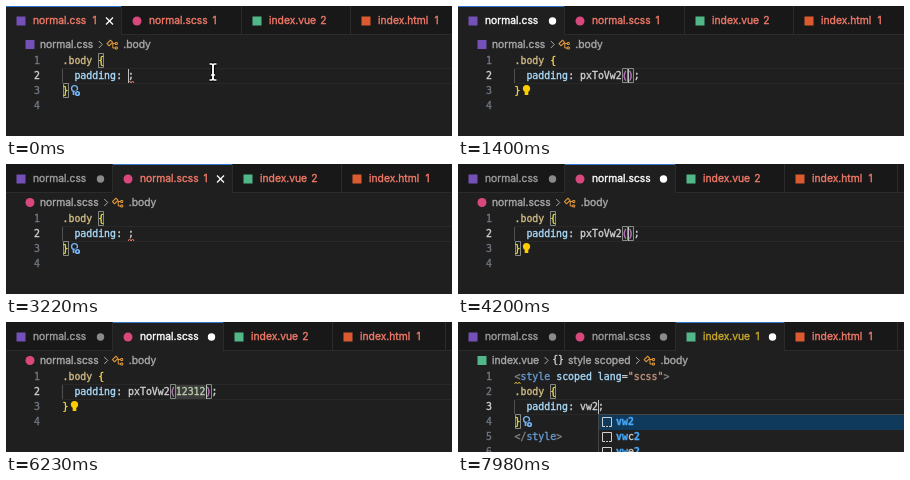
Animation of 446 by 130 pixels, one loop 8000 ms. Source, as an HTML page with a canvas:

```html
<!DOCTYPE html>
<html lang="en">
<head>
<meta charset="utf-8">
<style>
  html, body { margin: 0; width: 100%; height: 100%; overflow: hidden; background: #1f1f1f; }
  canvas { display: block; }
</style>
</head>
<body>
<canvas></canvas>
<script>
const W = 446, H = 130, LOOP = 8000, TICK = 70, BLINK = 500;
const CHAR = 5.96, CODE_X = 56.5, FIRST_LINE = 55, LINE = 15;
const UI = '10.3px Inter, sans-serif';
const MONO = '9.9px "DejaVu Sans Mono", monospace';
const RED = '#f17a69', YELLOW = '#c8a82b', GREY = '#9d9d9d', TEXT = '#d0d0d0';

const canvas = document.querySelector('canvas');
const ctx = canvas.getContext('2d');
const ratio = window.devicePixelRatio || 1;
canvas.width = W * ratio;
canvas.height = H * ratio;
canvas.style.width = W + 'px';
canvas.style.height = H + 'px';
ctx.scale(ratio, ratio);

// keys: times of "vw2"; accept: completion chosen; digits: times of "12312"
const files = [
  { name: 'normal.css', color: '#7450b8', width: 107, badge: 9,
    start: -430, bulb: -430, keys: [280, 420, 560], accept: 1050, digits: [1470, 1540, 1610, 1680, 1740] },
  { name: 'normal.scss', color: '#d9487d', round: true, width: 111, badge: 9,
    start: 2720, bulb: 3080, keys: [3430, 3570, 3710], accept: 3990, digits: [4270, 4480, 4760, 4970, 5100] },
  { name: 'index.vue', color: '#52b788', width: 109, badge: 0, vue: true,
    start: 6700, bulb: 7560, keys: [7490, 7630, 7840], accept: Infinity, digits: [] },
  { name: 'index.html', color: '#dc5a30', width: 113, badge: 0, start: Infinity, keys: [Infinity] }
];

function rect(x, y, w, h, color) {
  ctx.fillStyle = color;
  ctx.fillRect(x, y, w, h);
}

function frame(x, y, w, h, color) {
  ctx.strokeStyle = color;
  ctx.lineWidth = 1;
  ctx.strokeRect(x, y, w, h);
}

function disc(x, y, r, color) {
  ctx.fillStyle = color;
  ctx.beginPath();
  ctx.arc(x, y, r, 0, 2 * Math.PI);
  ctx.fill();
}

function line(points, color, width = 1) {
  ctx.strokeStyle = color;
  ctx.lineWidth = width;
  ctx.beginPath();
  points.forEach(([x, y]) => ctx.lineTo(x, y));
  ctx.stroke();
}

// A hairline outline gives the slightly heavy look of smoothed screen text.
function text(value, x, y, color, font = UI, align = 'left') {
  ctx.font = font;
  ctx.fillStyle = ctx.strokeStyle = color;
  ctx.lineWidth = .35;
  ctx.lineJoin = 'round';
  ctx.textAlign = align;
  ctx.textBaseline = 'middle';
  ctx.fillText(value, x, y);
  ctx.strokeText(value, x, y);
  return ctx.measureText(value).width;
}

function code(runs, x, y) {
  for (const [value, color, font = MONO] of runs) {
    text(value, x, y, color, font);
    x += value.length * CHAR;
  }
}

const column = n => CODE_X + n * CHAR;
const rowY = n => FIRST_LINE + (n - 1) * LINE;
const passed = (times, t) => times.filter(time => time <= t).length;

function fileIcon(file, x, y) {
  if (file.round) disc(x, y, 4.5, file.color);
  else rect(x - 4.5, y - 4.5, 9, 9, file.color);
}

function problems(file, t) {
  const fixed = t >= file.keys[0] + 280;
  if (!fixed) return { count: file.vue ? 2 : 1, color: RED };
  return { count: file.vue ? 1 : 0, color: YELLOW };
}

function drawTabs(t, active) {
  rect(0, 0, W, 29, '#181818');
  rect(0, 28, W, 1, '#2b2b2b');
  let x = 0;
  for (const file of files) {
    const isActive = file === active, { count, color } = problems(file, t);
    const width = file.width + (count ? file.badge : 0), right = x + width;
    if (isActive) {
      rect(x, 0, width, 29, '#1f1f1f');
      rect(x, 0, width, 1, '#2f76cc');
    }
    rect(right - 1, 0, 1, 29, '#2b2b2b');
    fileIcon(file, x + 15, 15);
    const ink = count ? color : isActive ? '#ffffff' : GREY;
    text(file.name, x + 27, 15, ink);
    if (count) text(count, right - 27.5, 15, ink, UI, 'center');
    if (t >= file.keys[0]) {
      disc(right - 12.5, 15, 3.7, isActive ? '#ffffff' : '#8a8a8a');
    } else if (isActive) {
      const cx = right - 12.5;
      line([[cx - 3.5, 11.5], [cx + 3.5, 18.5]], '#ffffff', 1.3);
      line([[cx + 3.5, 11.5], [cx - 3.5, 18.5]], '#ffffff', 1.3);
    }
    x = right;
  }
}

function symbolIcon(x, y) {
  const color = '#e29a3c';
  ctx.save();
  ctx.translate(x - 2.5, y - 1.5);
  ctx.rotate(-Math.PI / 4);
  frame(-2.5, -1.5, 5, 3, color);
  ctx.restore();
  line([[x, y - 1], [x + 3, y - 1]], color);
  line([[x + .5, y - 1], [x + .5, y + 3.5], [x + 3, y + 3.5]], color);
  frame(x + 3, y - 2, 2, 2, color);
  frame(x + 3, y + 2.5, 2, 2, color);
}

function drawBreadcrumb(file) {
  const y = 38.5, color = '#a9a9a9';
  const chevron = x => line([[x - 1.5, y - 3.5], [x + 2, y], [x - 1.5, y + 3.5]], color);
  fileIcon(file, 24, y);
  let x = 34 + text(file.name, 34, y, color);
  chevron(x + 7);
  if (file.vue) {
    text('{}', x + 19, y, TEXT, MONO, 'center');
    x += 29 + text('style scoped', x + 29, y, color);
    chevron(x + 7);
  }
  symbolIcon(x + 19, y);
  text('.body', x + 30, y, color);
}

function squiggle(x, y, color) {
  line([0, 1, 2, 3, 4].map(i => [x + i * 1.5, y + (i % 2 ? -1 : 1)]), color);
}

function bracketBox(col, row) {
  const x = Math.round(column(col)) + .5, y = Math.round(rowY(row)) - 7.5;
  rect(x, y, 5, 14, 'rgba(0,100,0,.1)');
  frame(x, y, 5, 14, '#888888');
}

function bulb(x, y, autofix) {
  const color = autofix ? '#75b5f5' : '#ffcc00';
  disc(x, y - 1.5, 3.6, color);
  rect(x - 1.8, y + 1, 3.6, 4, color);
  if (autofix) {
    disc(x, y - 1.5, 2.2, '#1f1f1f');
    disc(x + 3, y + 3.5, 3.2, '#1f1f1f');
    disc(x + 3, y + 3.5, 2.6, color);
    disc(x + 3, y + 3.5, .9, '#1f1f1f');
  }
}

function drawSuggestions(x, y, typed) {
  rect(x, y, W, H, '#202020');
  frame(x + .5, y + .5, W, H, '#454545');
  ['vw2', 'vwc2', 'vwe2', 'vwo2'].forEach((word, i) => {
    const mid = y + 8 + i * LINE;
    if (!i) rect(x + 1, y + 1, W, LINE, '#0f3a5c');
    frame(x + 4.5, mid - 4.5, 9, 9, TEXT);
    rect(x + 7, mid + 4, 1, 1, '#202020');
    rect(x + 10, mid + 4, 1, 1, '#202020');
    code([...word].map(c => typed.includes(c) ? [c, '#48a8f8', 'bold ' + MONO] : [c, TEXT]), x + 18, mid);
  });
}

function drawEditor(t, file) {
  const offset = file.vue ? 1 : 0, row = 2 + offset, y = rowY(row);
  const typed = 'vw2'.slice(0, passed(file.keys, t));
  const digits = '12312'.slice(0, passed(file.digits, t));
  const accepted = t >= file.accept;

  rect(CODE_X - .5, y - 8, W, 1, '#282828');
  rect(CODE_X - .5, y + 7, W, 1, '#282828');
  for (let n = 1; n <= (file.vue ? 6 : 4); n++)
    text(n, 34, rowY(n), n === row ? TEXT : '#6e7681', MONO, 'right');
  rect(CODE_X - .5, y - 7, 1, 14, '#505050');

  const braceBoxes = !accepted || (file === files[1] && t < file.digits[0]);
  if (braceBoxes) {
    bracketBox(6, 1 + offset);
    bracketBox(0, 3 + offset);
  }

  if (file.vue) {
    const tag = '#808080', name = '#679ad1', attr = '#a8dafa';
    code([['<', tag], ['style', name], [' scoped lang', attr], ['=', TEXT],
      ['"scss"', '#c5947c'], ['>', tag]], CODE_X, rowY(1));
    squiggle(CODE_X, rowY(1) + 6, YELLOW);
    code([['</', tag], ['style', name], ['>', tag]], CODE_X, rowY(5));
  }
  code([['.body ', '#d2bb85'], ['{', '#f9d849']], CODE_X, rowY(1 + offset));
  code([['}', '#f9d849']], CODE_X, rowY(3 + offset));

  if (accepted) {
    rect(column(19), y - 7, Math.max(1, digits.length * CHAR), 14, 'rgba(124,124,124,.3)');
    bracketBox(18, row);
    bracketBox(19 + digits.length, row);
  }
  const value = accepted
    ? [['pxToVw2', TEXT], ['(', '#cc76d1'], [digits, '#bacdab'], [')', '#cc76d1']]
    : [[typed, TEXT]];
  code([['  padding', '#a8dafa'], [': ', TEXT], ...value, [';', TEXT]], CODE_X, y);
  if (t < file.keys[0] + 280) squiggle(column(11 + typed.length), y + 6, RED);

  if (t >= file.bulb) bulb(68.5, rowY(3 + offset) - 1, !accepted);

  const caret = Math.round(column(accepted ? 19 + digits.length : 11 + typed.length));
  const events = [file.start, ...file.keys, file.accept, ...file.digits];
  const last = Math.max(...events.filter(time => time <= t));
  if (Math.floor((t - last) / BLINK) % 2 === 0) rect(caret, y - 7, 1, 14, '#c0c0c0');

  if (typed && !accepted && t >= file.keys[0] + TICK)
    drawSuggestions(caret, y + 7, typed);
}

function drawPointer(x, y) {
  for (const [color, width] of [['#000000', 3.5], ['#ffffff', 1.5]]) {
    line([[x - 3.5, y - 8], [x - 1, y - 8], [x, y - 6.5], [x, y + 6.5], [x - 1, y + 8], [x - 3.5, y + 8]], color, width);
    line([[x + 3.5, y - 8], [x + 1, y - 8], [x, y - 6.5], [x, y + 6.5], [x + 1, y + 8], [x + 3.5, y + 8]], color, width);
    line([[x - 2, y + 3], [x + 2, y + 3]], color, width);
  }
}

function draw(now) {
  const t = Math.floor((now % LOOP) / TICK) * TICK;
  const active = files.filter(file => file.start <= t).pop();
  rect(0, 0, W, H, '#1f1f1f');
  drawTabs(t, active);
  drawBreadcrumb(active);
  drawEditor(t, active);
  if (t < files[0].keys[0]) drawPointer(207, 66);
}

const begin = performance.now();
function tick() {
  draw(performance.now() - begin);
  requestAnimationFrame(tick);
}
tick();
</script>
</body>
</html>
```
